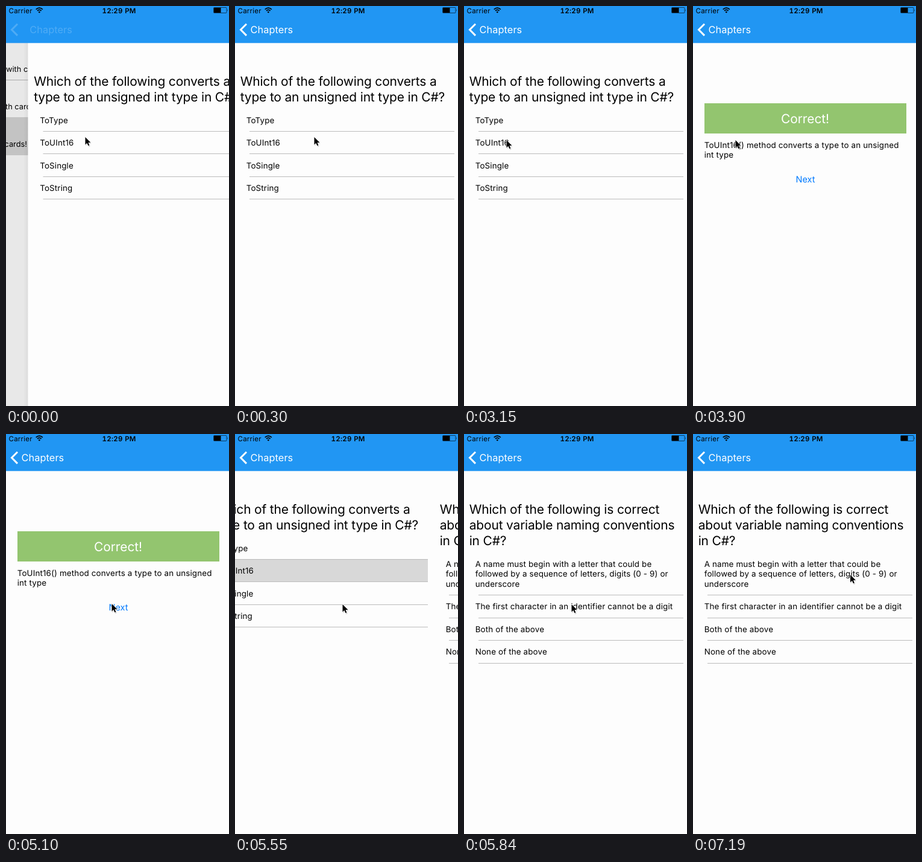
An HTML page that plays this animation: 370 by 662 pixels, repeating every 8000 ms.

```html
<!DOCTYPE html>
<html lang="en">
<head>
<meta charset="utf-8">
<title>Quiz</title>
<style>
html, body { margin: 0; width: 100%; height: 100%; overflow: hidden; background: #fdfdfd; }
svg { display: block; width: 370px; height: 662px; }
text {
  font-family: Inter, Roboto, sans-serif;
  font-optical-sizing: none;
  font-feature-settings: "calt" 0;
  text-rendering: geometricPrecision;
  white-space: pre;
}
.title { font-size: 21px; letter-spacing: -.18px; }
.item { font-size: 13.4px; letter-spacing: .14px; }
.old { font-size: 12.8px; }
.nav { font-size: 16.3px; letter-spacing: .1px; fill: #fff; }
.carrier { font-size: 11.5px; letter-spacing: .25px; }
.clock { font-size: 11.5px; letter-spacing: .3px; font-weight: 600; font-variant-numeric: tabular-nums; }
.result { font-size: 21px; letter-spacing: -.1px; fill: #fff; }
.next { font-size: 14.5px; fill: #007aff; }
.rule { stroke: #bcbcbc; stroke-width: 1; }
</style>
</head>
<body>
<svg viewBox="0 0 370 662">
  <linearGradient id="shade">
    <stop offset="0" stop-opacity="0"/>
    <stop offset="1" stop-opacity=".05"/>
  </linearGradient>
  <g id="chapters">
    <rect y="61" width="370" height="601" fill="#e8e8e8"/>
    <rect y="184" width="370" height="63" fill="#c3c3c3"/>
    <path class="rule" d="M0 122.5H370" style="stroke:#a9a9a9"/>
    <text class="old" x="0" y="109">with cards!</text>
    <text class="old" x="-1" y="171">th cards!</text>
    <text class="old" x="-2.5" y="233">cards!</text>
  </g>
  <g id="first">
    <rect x="-9" y="61" width="8" height="601" fill="url(#shade)"/>
    <rect x="-1" y="61" width="376" height="601" fill="#fdfdfd"/>
    <rect id="picked" y="207" width="364" height="37.5" fill="#d8d8d8"/>
  </g>
  <g id="second">
    <rect y="61" width="375" height="601" fill="#fdfdfd"/>
  </g>
  <g id="answer">
    <rect y="61" width="370" height="601" fill="#fdfdfd"/>
    <rect x="19" y="161" width="335" height="50" fill="#93c56f"/>
    <text class="result" x="186" y="194" text-anchor="middle">Correct!</text>
    <text class="item" x="18.7" y="234.5">ToUInt16() method converts a type to an unsigned</text>
    <text class="item" x="18.7" y="251">int type</text>
    <text class="next" x="186.5" y="292" text-anchor="middle">Next</text>
  </g>
  <rect width="370" height="61.3" fill="#2196f3"/>
  <g id="back">
    <path d="M19 29.7L9.5 39.3L19 48.9" fill="none" stroke="#fff" stroke-width="3"/>
    <text id="label" class="nav" x="25.5" y="45">Chapters</text>
  </g>
  <text class="carrier" x="4.5" y="11.5">Carrier</text>
  <g fill="none" stroke="#000" stroke-width="1.6">
    <path d="M49.7 5.6Q55.3 .7 60.9 5.6M51.9 7.9Q55.3 4.9 58.7 7.9"/>
    <path d="M55.3 11.8L53.4 9.7Q55.3 8.2 57.2 9.7Z" fill="#000" stroke="none"/>
  </g>
  <text class="clock" x="187.6" y="11.5" text-anchor="middle">12:29 PM</text>
  <rect x="344.5" y="2.5" width="21.5" height="9" rx="1" fill="none" stroke="#000" stroke-opacity=".6"/>
  <rect x="345" y="3" width="11.5" height="8"/>
  <path d="M367 5.2q1.3 1.8 0 3.6z"/>
  <g id="cursor">
    <path d="M.5 1.5V14.5L3.4 11.6L5.6 16.3L8.2 15.2L6.1 10.7H10Z" opacity=".2"/>
    <path d="M0 0V12.6L2.9 9.8L4.9 14.3L6.9 13.4L5 9H9Z" stroke="#fff" stroke-width="1.3" paint-order="stroke"/>
  </g>
</svg>
<script>
const LOOP = 8000;
const $ = id => document.getElementById(id);

function add(parent, tag, attrs, content = '') {
  const el = document.createElementNS('http://www.w3.org/2000/svg', tag);
  for (const key in attrs) el.setAttribute(key, attrs[key]);
  el.textContent = content;
  parent.append(el);
}

function question(page, title, rows) {
  title.forEach((line, i) => add(page, 'text', { class: 'title', x: 8.7, y: 132.2 + 26 * i }, line));
  let y = 116.8 + 26.4 * title.length;
  for (const lines of rows) {
    lines.forEach((line, i) => add(page, 'text', { class: 'item', x: 18.7, y: y + 23.9 + 16.5 * i }, line));
    y += 37.5 + 16.5 * (lines.length - 1);
    add(page, 'path', { class: 'rule', d: `M24 ${Math.floor(y) + .5}H364` });
  }
}

question($('first'),
  ['Which of the following converts a', 'type to an unsigned int type in C#?'],
  [['ToType'], ['ToUInt16'], ['ToSingle'], ['ToString']]);
question($('second'),
  ['Which of the following is correct', 'about variable naming conventions', 'in C#?'],
  [['A name must begin with a letter that could be', 'followed by a sequence of letters, digits (0 - 9) or', 'underscore'],
   ['The first character in an identifier cannot be a digit'],
   ['Both of the above'], ['None of the above']]);

// [start ms, x, y]
const cursorSteps = [
  [0, 131.5, 217], [1200, 163, 245.5], [1350, 194.5, 277], [1500, 222.5, 302], [1650, 226.5, 306],
  [2700, 217.5, 299], [2850, 146.5, 245], [3000, 87.5, 225], [3150, 70.5, 222],
  [4800, 87.5, 231], [4950, 143.5, 259], [5100, 175.5, 281], [5250, 178.5, 282],
  [6740, 203, 274], [6890, 237.5, 252], [7040, 258.5, 234], [7190, 261, 233]
];
// [start ms, offset of the first question]
const pageSteps = [[0, 37.5], [150, 4], [300, 0], [5550, -44], [5700, -315], [5840, -375]];

const at = (steps, t) => steps.findLast(step => step[0] <= t);
const move = (id, x, y = 0) => $(id).setAttribute('transform', `translate(${x} ${y})`);
const show = (id, on) => $(id).setAttribute('visibility', on ? 'visible' : 'hidden');

function draw(t) {
  const [, x] = at(pageSteps, t);
  const [, cx, cy] = at(cursorSteps, t);
  const entering = t < 150;
  move('first', x);
  move('second', x + 375);
  move('chapters', entering ? 0 : -10);
  move('cursor', cx, cy);
  show('chapters', t < 300);
  show('second', t >= 5550);
  show('picked', t >= 3900);
  show('answer', t >= 3900 && t < 5550);
  $('back').setAttribute('opacity', entering ? .2 : 1);
  $('label').setAttribute('x', entering ? 39.2 : 25.5);
}

const start = performance.now();
function tick() {
  draw((performance.now() - start) % LOOP);
  requestAnimationFrame(tick);
}
tick();
</script>
</body>
</html>
```
